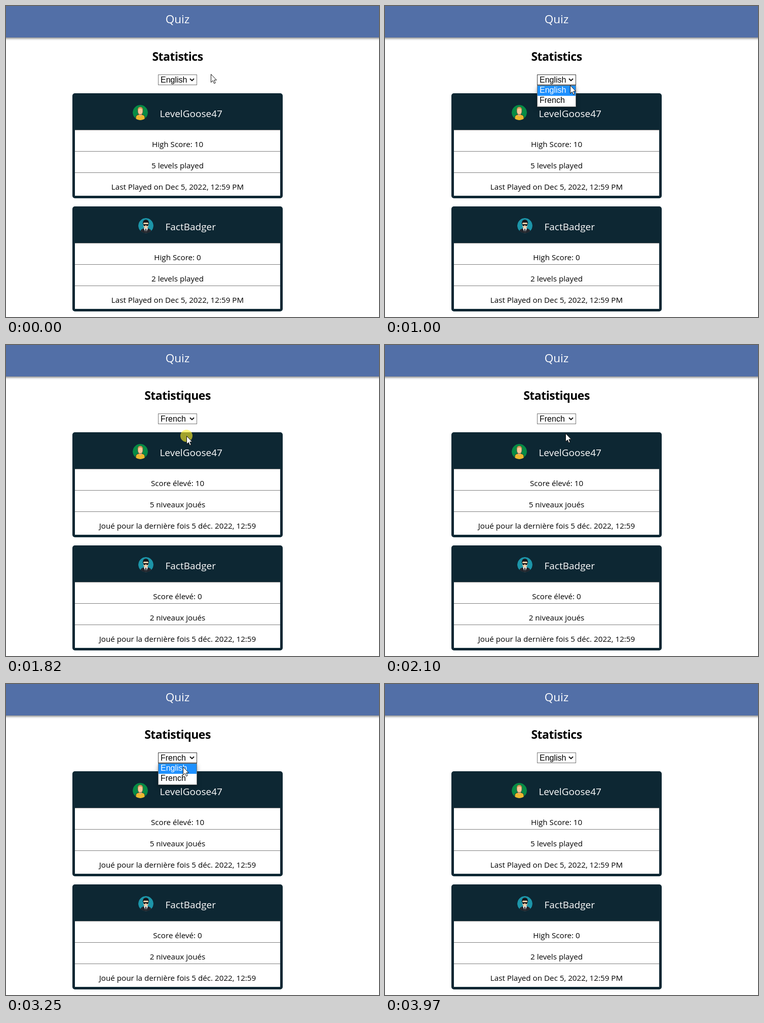
These frames come from a looping animation (736 by 613 pixels, 4.04 s). An HTML page:

```html
<!DOCTYPE html>
<html lang="en">
<head>
<meta charset="utf-8">
<title>Quiz statistics</title>
<style>
  html, body { margin: 0; width: 100%; height: 100%; overflow: hidden; background: #fff; }
  svg { display: block; }
  text { font: 15.2px "Open Sans", "Noto Sans", sans-serif; white-space: pre; }
  .mid { text-anchor: middle; }
  .title { font-size: 22.5px; fill: #fff; }
  .heading { font-size: 23px; font-weight: 700; letter-spacing: -.5px; }
  .name { font-size: 19px; fill: #fff; }
  .ui { font: 16px "Liberation Sans", Arial, sans-serif; }
  .bar { filter: drop-shadow(0 2px 2px rgba(0, 0, 0, .5)); }
  .popup { filter: drop-shadow(0 4px 4px rgba(0, 0, 0, .35)); }
</style>
</head>
<body>
<svg width="736" height="613" viewBox="0 0 736 613">
  <defs>
    <clipPath id="disc"><circle r="15"/></clipPath>
    <g id="panel">
      <rect x="131" y="172" width="415" height="207" rx="5" fill="#0d2733"/>
      <rect x="136" y="244" width="405" height="130" fill="#fff"/>
      <path d="M136 244.5h405M136 286.5h405M136 328.5h405" stroke="#808080"/>
    </g>
  </defs>

  <rect class="bar" x="-10" y="-10" width="756" height="72" fill="#526fa7"/>
  <text class="mid title" x="338.5" y="34">Quiz</text>
  <text class="mid heading" id="heading" x="338.5" y="108"></text>

  <use href="#panel"/>
  <use href="#panel" y="223"/>
  <text class="name" x="303.5" y="219">LevelGoose47</text>
  <text class="name" x="314.5" y="442">FactBadger</text>
  <g id="rows"></g>

  <g transform="translate(265 210)" clip-path="url(#disc)">
    <circle r="15" fill="#078b45"/>
    <path d="M-9 16V10Q-9 5-3 4H3Q9 5 9 10V16Z" fill="#edb82e" stroke="#243238"/>
    <path d="M-3 2H3V5L0 8-3 5Z" fill="#e9ae7d"/>
    <path d="M-5-5Q-5-11 0-11T5-5V-1Q4 4 0 4T-5-1Z" fill="#f6c798" stroke="#5b4630" stroke-width=".8"/>
    <path d="M-5-4Q-5-11 0-11T5-4Q3-8 0-8T-5-4Z" fill="#d49a58"/>
  </g>

  <g transform="translate(276 433)" clip-path="url(#disc)">
    <circle r="15" fill="#1c95a9"/>
    <path d="M-11 16V11Q-10 7-4 5H4Q10 7 11 11V16Z" fill="#23262d"/>
    <path d="M-4 5 0 15 4 5Z" fill="#fff"/>
    <path d="M-1 6H1L1.5 13 0 15-1.5 13Z" fill="#23262d"/>
    <path d="M-5-5Q-5-10 0-10T5-5V0Q4 5 0 6-4 5-5 0Z" fill="#f2cfaa"/>
    <path d="M-6-2Q-7-12 0-12T6-2L4-6H-4Z" fill="#17191e"/>
    <path d="M-5-3H5V-1Q4 1 2 1L.5-1H-.5L-2 1Q-4 1-5-1Z" fill="#17191e"/>
  </g>

  <rect id="box" x="300.5" y="135.5" width="76" height="20" fill="#fff"/>
  <text class="ui" id="value" x="305" y="151"></text>
  <path d="M363 143.2 367 147.2 371 143.2" fill="none" stroke="#111" stroke-width="2"/>

  <g id="popup">
    <rect class="popup" x="300" y="156" width="77" height="43" fill="#767676"/>
    <rect x="301" y="157" width="75" height="41" fill="#fff"/>
    <rect id="hot" x="301" width="75" height="20" fill="#1e90ff"/>
    <text class="ui" id="opt0" x="305" y="171">English</text>
    <text class="ui" id="opt1" x="305" y="191">French</text>
  </g>

  <g id="cursor">
    <circle id="press" r="12" fill="#fff028" fill-opacity=".62"/>
    <path d="M.5.5V16.5L4.2 13 6.7 18.7 9.2 17.6 6.8 12H11.5Z" fill="#fff" stroke="#111"/>
  </g>
</svg>

<script>
const LOOP = 4040;
const el = id => document.getElementById(id);

const words = [
  { heading: "Statistics", score: "High Score: ", levels: " levels played",
    last: "Last Played on Dec 5, 2022, 12:59 PM" },
  { heading: "Statistiques", score: "Score élevé: ", levels: " niveaux joués",
    last: "Joué pour la dernière fois 5 déc. 2022, 12:59" }
];
const players = [{ score: 10, levels: 5 }, { score: 0, levels: 2 }];

// start, end, number of hops, from x, y, to x, y
const moves = [
  [0, 1, 1, 404, 134, 404, 134],
  [70, 340, 4, 396, 136, 366, 144],
  [1000, 1360, 5, 365, 156, 356, 179],
  [2100, 2380, 4, 356, 174, 356, 142],
  [3040, 3250, 3, 355, 147, 349, 163]
];
const presses = [[610, 740], [1690, 1890], [2710, 2840], [3710, 3910]];
const opened = [[610, 1780], [2710, 3780]];
const french = [[1780, 3780]];

const during = (spans, t) => spans.some(([a, b]) => t >= a && t < b);
const show = (id, on) => el(id).setAttribute("visibility", on ? "visible" : "hidden");

function pointer(t) {
  const [a, b, hops, x0, y0, x1, y1] = moves.findLast(m => t >= m[0]);
  const k = Math.min(1, Math.floor((t - a) / (b - a) * hops + .01) / hops);
  return [Math.round(x0 + (x1 - x0) * k), Math.round(y0 + (y1 - y0) * k)];
}

let shown = -1;
function setLanguage(lang) {
  if (lang === shown) return;
  shown = lang;
  const w = words[lang];
  el("heading").textContent = w.heading;
  el("value").textContent = ["English", "French"][lang];
  el("rows").innerHTML = players.map((p, i) =>
    [w.score + p.score, p.levels + w.levels, w.last].map((line, j) =>
      `<text class="mid" x="338.5" y="${278 + 223 * i + 42 * j}">${line}</text>`
    ).join("")).join("");
}

function draw(t) {
  const [x, y] = pointer(t);
  const lang = +during(french, t);
  const open = during(opened, t);
  const hover = x >= 300 && x < 377 && y >= 135 && y < 156;
  const hot = y >= 177 ? 1 : y >= 156 ? 0 : lang;

  setLanguage(lang);
  el("box").setAttribute("stroke", open || hover ? "#3c3c3c" : "#767676");
  show("popup", open);
  el("hot").setAttribute("y", 157 + 20 * hot);
  [0, 1].forEach(i => el("opt" + i).setAttribute("fill", i === hot ? "#fff" : "#000"));

  const visible = t < 3970;
  show("cursor", visible);
  show("press", visible && during(presses, t));
  el("cursor").setAttribute("transform", `translate(${x} ${y})`);
}

const start = performance.now();
function tick() {
  draw((performance.now() - start) % LOOP);
  requestAnimationFrame(tick);
}
tick();
</script>
</body>
</html>
```
